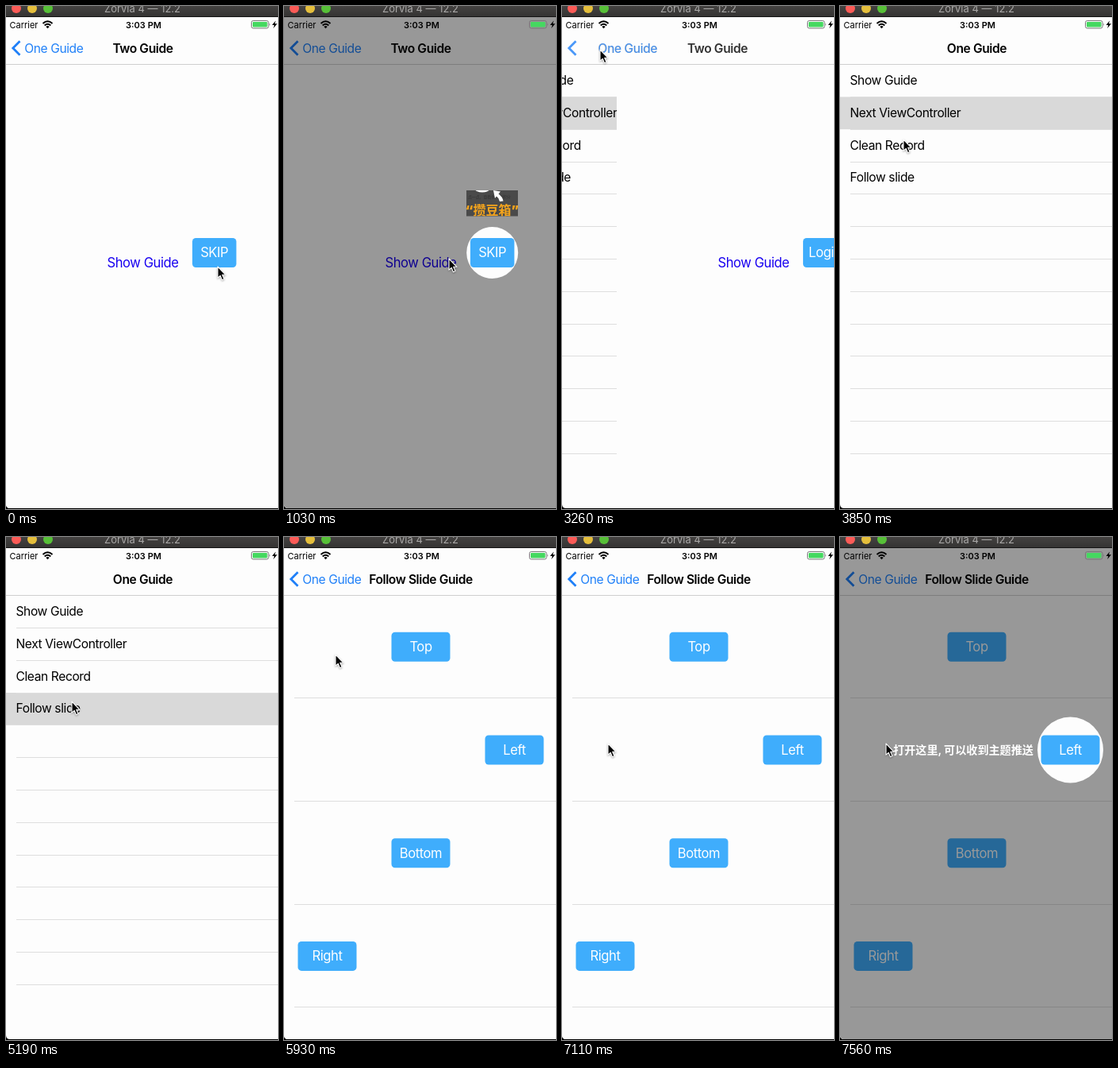
These frames come from a looping animation (343x633 px, 8000 ms). An HTML page:

```html
<!DOCTYPE html>
<html lang="en">
<head>
<meta charset="utf-8">
<title>Guide demo</title>
<style>
  html, body { margin: 0; width: 100%; height: 100%; overflow: hidden; background: #000; }
  svg { display: block; width: 343px; height: 633px; }
  text { font: 15.6px Inter, "Noto Sans CJK SC", "Noto Sans CJK", sans-serif; letter-spacing: -.026em; white-space: pre; }
  .mid { text-anchor: middle; }
  .title { font-weight: 600; }
  .button { font-size: 16.6px; fill: #fff; }
  .link { font-size: 16.6px; fill: #1800f0; }
  .status { font-size: 11px; letter-spacing: 0; }
  .hint { font-size: 14.1px; font-weight: 700; fill: #fff; letter-spacing: 0; }
  .blue { fill: #2080f8; }
  .line { stroke: #dedede; stroke-width: 1; }
</style>
</head>
<body>
<svg viewBox="0 0 343 633">
  <defs>
    <linearGradient id="bar" x2="0" y2="1">
      <stop stop-color="#444241"/><stop offset="1" stop-color="#353433"/>
    </linearGradient>
    <clipPath id="screen"><path d="M0 14H343V632H5Q0 632 0 627Z"/></clipPath>
    <clipPath id="card"><rect x="230" y="232" width="65" height="32.500"/></clipPath>
  </defs>

  <g clip-path="url(#screen)">
    <rect y="14" width="343" height="619" fill="#fdfdfd"/>
    <g id="one"></g>
    <g id="two">
      <rect y="74" width="346" height="559" fill="#fdfdfd"/>
      <text class="link mid" x="172.500" y="329">Show Guide</text>
    </g>
    <g id="slide"><rect y="74" width="346" height="559" fill="#fdfdfd"/></g>

    <rect y="14" width="343" height="59" fill="#fdfdfd"/>
    <path d="M0 73.500H343" stroke="#cfcfcf"/>
    <path id="chevron" d="M17.500 44.300L8.800 53L17.500 61.700" fill="none" stroke="#2080f8" stroke-width="2.800"/>
    <text id="oneTitle" class="title mid" y="58.700">One Guide</text>
    <text id="back" class="blue mid" y="58.700">One Guide</text>
    <text id="detailTitle" class="title mid" y="58.700"></text>

    <g id="guides"></g>

    <text class="status" x="4.500" y="27.500">Carrier</text>
    <g fill="none" stroke="#000" stroke-width="2">
      <path d="M46.500 22Q52.500 16.500 58.500 22M48.700 24.600Q52.500 21 56.300 24.600"/>
      <path d="M50.300 25.900Q52.500 24.200 54.700 25.900L52.500 28.300Z" fill="#000" stroke="none"/>
    </g>
    <text class="status mid" x="173.500" y="27.500" font-weight="600" style="font-weight:600">3:03 PM</text>
    <rect x="309.500" y="18.500" width="21.500" height="9.500" rx="2.200" fill="none" stroke="#777"/>
    <rect x="311" y="20" width="18.500" height="6.500" rx="1" fill="#45d860"/>
    <path d="M332.300 21.500Q334 23.200 332.300 25Z" fill="#777"/>
    <path d="M340 18.500L335.500 24H338.300L337.200 28L342 22.300H339Z"/>
  </g>

  <rect width="343" height="13" fill="url(#bar)"/>
  <path d="M0 13.500H343" stroke="#151515"/>
  <circle cx="13" cy="3" r="6" fill="#fc5b57"/>
  <circle cx="33" cy="3" r="6" fill="#e5bf3c"/>
  <circle cx="53" cy="3" r="6" fill="#57c038"/>
  <text class="mid" x="172" y="8" fill="#a9a8a7" style="font-size:13px;letter-spacing:0">Zorvia 4 — 12.2</text>

  <path id="cursor" d="M0 0V14.200L3.200 11.300L5.500 16.700L8 15.600L5.700 10.300H10Z"
    stroke="#fff" stroke-width="1.100" stroke-linejoin="round" style="filter:drop-shadow(0 1px 1px #0005)"/>
</svg>

<script>
const $ = id => document.getElementById(id);
const add = (id, markup) => $(id).insertAdjacentHTML('beforeend', markup);
const LOOP = 8000, STEP = 148.2, WIDTH = 345, CENTER = 172.5, BACK_X = 60.3;
const ROW = 40.8, SLIDE_ROW = 129.7;
const HINT = '打开这里, 可以收到主题推送';

const line = y => `<path class="line" d="M13 ${Math.round(y) + .5}H346"/>`;
const button = (x, y, w, label, id = '') =>
  `<rect x="${x - w / 2}" y="${y - 18.5}" width="${w}" height="37" rx="4.500" fill="#3fadfc"/>
   <text class="button mid" x="${x}" y="${y + 5.9}" id="${id}">${label}</text>`;
const guide = (x, y, r, extra) =>
  `<g><path fill-rule="evenodd" fill-opacity=".4" d="M0 14H343V633H0ZM${x - r} ${y}a${r} ${r} 0 1 0 ${2 * r} 0a${r} ${r} 0 1 0 ${-2 * r} 0Z"/>${extra}</g>`;
const hint = (x, y) => `<text class="hint mid" x="${x}" y="${y}">${HINT}</text>`;

// Pages
add('one', `<rect id="selected" width="346" height="${ROW}" fill="#d9d9d9"/>`);
for (let i = 1; i <= 12; i++) add('one', line(73.2 + ROW * i));
['Show Guide', 'Next ViewController', 'Clean Record', 'Follow slide'].forEach((label, i) =>
  add('one', `<text x="12.500" y="${99 + ROW * i}">${label}</text>`));
add('two', button(262.7, 310.5, 55.5, 'SKIP', 'action'));
[['Top', 172.5], ['Left', 290.5], ['Bottom', 172.5], ['Right', 54.5]].forEach(([label, x], i) =>
  add('slide', button(x, 138.3 + SLIDE_ROW * i, 74, label) + line(72.5 + SLIDE_ROW * (i + 1))));

// Guide overlays
const card = `<g clip-path="url(#card)">
  <rect x="230" y="232" width="65" height="33" fill="#4a4a4a"/>
  <text x="232" y="242" fill="#303030" style="font-size:5px">点一点，查看你的新积分</text>
  <ellipse cx="250" cy="230.500" rx="9" ry="4" fill="#fff"/>
  <path d="M264 232L273 233.500L270.500 236.500Q275.500 240 276.500 245.500L272 246Q271 241.500 268 239.500L266 242Z" fill="#fff"/>
  <text class="mid" x="262.500" y="263" fill="#f6a51c" style="font-size:16px;font-weight:900;letter-spacing:0">“攒豆箱”</text></g>`;
add('guides', guide(262.7, 310.5, 32.5, card)
  + guide(172.5, 138.3, 41.5, hint(172.5, 79.5))
  + guide(290.5, 268, 41.5, hint(155.5, 273)));

// Keys: step, then values, linear in between
const cursorKeys = [[0, 267, 328], [4, 184, 311], [6, 184, 311], [7, 208, 318], [11, 263, 313],
  [17, 263, 313], [21, 48, 54], [23, 48, 56], [25, 66, 120], [26, 80, 168], [28, 83, 177],
  [29, 83, 177], [33, 83, 207], [35, 83, 207], [39, 65, 148], [43, 65, 148], [46, 58, 260]];
const depthKeys = [[21, 1], [22, .8], [23, .25], [24, .04], [25, 0], [35, 0],
  [36, .4], [37, .88], [38, .98], [39, 1]];
const guideSpans = [[7, 15], [41, 48], [51, 99]];

const mix = (a, b, k) => a + (b - a) * k;
function track(keys, n) {
  const i = keys.findIndex(key => key[0] > n);
  if (i === 0) return keys[0].slice(1);
  if (i < 0) return keys[keys.length - 1].slice(1);
  const a = keys[i - 1], b = keys[i], k = (n - a[0]) / (b[0] - a[0]);
  return a.slice(1).map((v, j) => mix(v, b[j + 1], k));
}
const move = (id, x, y = 0) => $(id).setAttribute('transform', `translate(${x} ${y})`);
const fade = (id, value) => $(id).setAttribute('opacity', value);

function draw(n) {
  const [depth] = track(depthKeys, n);
  const first = n < 30;
  move('cursor', ...track(cursorKeys, n));
  move('one', -.3 * WIDTH * depth);
  move('two', WIDTH * (1 - depth));
  move('slide', WIDTH * (1 - depth));
  fade('two', first ? 1 : 0);
  fade('slide', first ? 0 : 1);

  const labelX = mix(CENTER, BACK_X, depth);
  move('oneTitle', labelX);
  move('back', labelX);
  move('detailTitle', mix(290, CENTER, depth));
  fade('oneTitle', 1 - depth);
  for (const id of ['back', 'chevron', 'detailTitle']) fade(id, depth);

  $('detailTitle').textContent = first ? 'Two Guide' : 'Follow Slide Guide';
  $('action').textContent = n < 15 ? 'SKIP' : 'Login';
  $('selected').setAttribute('y', 73.6 + ROW * (n < 35 ? 1 : 3));
  guideSpans.forEach(([from, to], i) =>
    $('guides').children[i].setAttribute('visibility', n >= from && n < to ? 'visible' : 'hidden'));
}

const start = performance.now();
function tick() {
  const t = (performance.now() - start) % LOOP;
  draw(Math.min(53, Math.floor((t + 14) / STEP)));
  requestAnimationFrame(tick);
}
tick();
</script>
</body>
</html>
```
